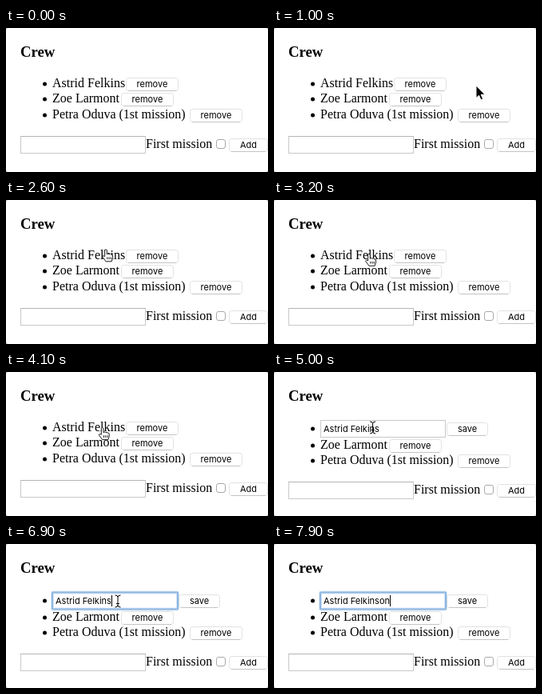
These frames come from a looping animation (328x180 px, 8000 ms). An HTML page:

```html
<!DOCTYPE html>
<html lang="en">
<head>
<meta charset="utf-8">
<title>Crew list</title>
<style>
  html, body { margin: 0; width: 100%; height: 100%; overflow: hidden; background: #fff; }
  svg { display: block; width: 328px; height: 180px; }
  text { font: 16px "Liberation Serif", Times, serif; white-space: pre; }
  .title { font-size: 18.72px; font-weight: bold; }
  .ui { font: 11px Inter, "Liberation Sans", sans-serif; }
  .mid { text-anchor: middle; }
  .button { fill: #fff; stroke: #e2e2e2; }
  .base { stroke: #c4c4c4; }
  .field { fill: #fff; stroke: #c9c9c9; }
  .focus { fill: none; stroke: #8db7e2; stroke-width: 2; }
  .halo { stroke-width: 4; opacity: .35; }
</style>
</head>
<body>
<svg id="stage" viewBox="0 0 328 180">
  <path fill="#aaa" d="M0 0h3q-3 0-3 3zM328 0v3q0-3-3-3zM0 180v-3q0 3 3 3zM328 180h-3q3 0 3-3z"/>
  <text class="title" x="18" y="36">Crew</text>
  <g id="view"></g>
  <g id="edit">
    <rect class="field" x="58.5" y="60.5" width="156" height="21"/>
    <g id="focus">
      <rect class="focus halo" x="58" y="60.5" width="157" height="21" rx="1"/>
      <rect class="focus" x="58" y="60.5" width="157" height="21" rx="1"/>
    </g>
    <text id="value" class="ui" x="62" y="75"></text>
    <rect id="caret" y="64" width="1" height="14"/>
  </g>
  <g id="second"></g>
  <g id="rest"></g>
  <g id="pointer">
    <path id="arrow" fill="#000" stroke="#fff" d="M0 0V15.5L3.6 12.2L6 17.8L8.6 16.7L6.2 11.2H11Z"/>
    <path id="hand" fill="#fff" stroke="#000" stroke-linejoin="round" transform="scale(.9)"
      d="M-1.5 9V1.2Q0-.6 1.5 1.2V7Q3 5.4 4.5 7Q6 5.8 7.3 7.5Q9.5 7 9.5 9.5V12L8 17H0L-4.8 10.5Q-4.5 8-1.5 10ZM2 11V14M4.5 11V14M7 11V14"/>
    <path id="beam" fill="none" stroke="#000" d="M-3.5-7.5Q0-7.5 0-5Q0-7.5 3.5-7.5M0-5V5M-3.5 7.5Q0 7.5 0 5Q0 7.5 3.5 7.5M-2 3H2"/>
  </g>
  <circle id="ring" fill="none" stroke="#000" stroke-width="3"/>
</svg>
<script>
const LOOP = 8000, STEP = 100;
const $ = id => document.getElementById(id);
const NAME = "Astrid Felkins";

const label = (x, y, text) => `<text x="${x}" y="${y}">${text}</text>`;
const bullet = y => `<circle cx="48.5" cy="${y}" r="2.5"/>`;
const button = (x, y, width, text) => `
  <rect class="button" x="${x + .5}" y="${y + .5}" width="${width - 1}" height="16" rx="3"/>
  <path class="base" d="M${x + 3} ${y + 16.5}h${width - 6}"/>
  <text class="ui mid" x="${x + width / 2}" y="${y + 12}">${text}</text>`;

$("view").innerHTML = bullet(70) + label(58, 74, NAME) + button(150, 62, 66, "remove");
$("edit").insertAdjacentHTML("afterbegin", bullet(71) + button(216, 63, 52, "save"));
$("second").innerHTML = bullet(89) + label(58, 93, "Zoe Larmont") + button(144, 81, 66, "remove");
$("rest").innerHTML =
  bullet(109) + label(58, 113, "Petra Oduva (1st mission)") + button(230, 101, 66, "remove") +
  `<rect class="field" x="18.5" y="135.5" width="156" height="21"/>
   <path stroke="#b5b5b5" d="M18 135.5h157"/>
   <rect class="field" x="263.5" y="139.5" width="11" height="11" rx="2.5" style="stroke:#aaa"/>` +
  label(175, 150, "First mission") + button(279, 138, 49, "Add");

// Pointer hotspot: time, x, y
const path = [
  [100, 283, 130], [800, 253, 72], [1200, 253, 72], [1900, 163, 32], [2000, 163, 32],
  [2800, 118, 67], [2900, 118, 67], [3200, 119, 67], [3400, 120, 71], [3600, 120.5, 69],
  [4900, 121, 70], [5200, 131, 68], [5500, 140, 71.5]
];

// Clicks: start, end, radius, centre
const clicks = [[800, 1000, 20, 254, 75], [4000, 4100, 15, 121, 71], [5800, 5900, 15, 139.5, 72]];

function pointerAt(t) {
  const i = path.findIndex(p => p[0] > t);
  if (i < 0) return path.at(-1).slice(1);
  const [t0, x0, y0] = path[Math.max(i - 1, 0)], [t1, x1, y1] = path[i];
  const u = Math.max(0, (t - t0) / (t1 - t0)), k = u * u * (3 - 2 * u);
  return [x0 + (x1 - x0) * k, y0 + (y1 - y0) * k];
}

const show = (id, on) => $(id).setAttribute("visibility", on ? "visible" : "hidden");
const move = (id, x, y) => $(id).setAttribute("transform", `translate(${x} ${y})`);

function draw(t) {
  const editing = t >= 4200, focused = t >= 5800;
  $("view").style.display = editing ? "none" : "";
  $("edit").style.display = editing ? "" : "none";
  move("second", 0, editing ? 3 : 0);
  move("rest", 0, editing ? 2 : 0);

  const typed = t >= 7900 ? 2 : t >= 7700 ? 1 : 0;
  $("value").textContent = NAME + "on".slice(0, typed);
  $("focus").style.display = focused ? "" : "none";
  if (editing) $("caret").setAttribute("x", Math.round(62 + $("value").getComputedTextLength()));
  const blinkedOff = (t >= 6300 && t < 6900) || (t >= 7500 && t < 7700);
  $("caret").style.display = focused && !blinkedOff ? "" : "none";

  const [x, y] = pointerAt(t);
  const visible = t >= 100 && t < 7700;
  const overName = t > 2000 && x < 149 && y > 60;
  move("pointer", x, y);
  show("arrow", visible && !overName);
  show("hand", visible && overName && !editing);
  show("beam", visible && editing);

  const click = clicks.find(([start, end]) => t >= start && t < end);
  show("ring", click);
  if (click) ["r", "cx", "cy"].forEach((key, i) => $("ring").setAttribute(key, click[i + 2]));
}

function frame() {
  draw(Math.floor(performance.now() % LOOP / STEP) * STEP);
  requestAnimationFrame(frame);
}
frame();
</script>
</body>
</html>
```
